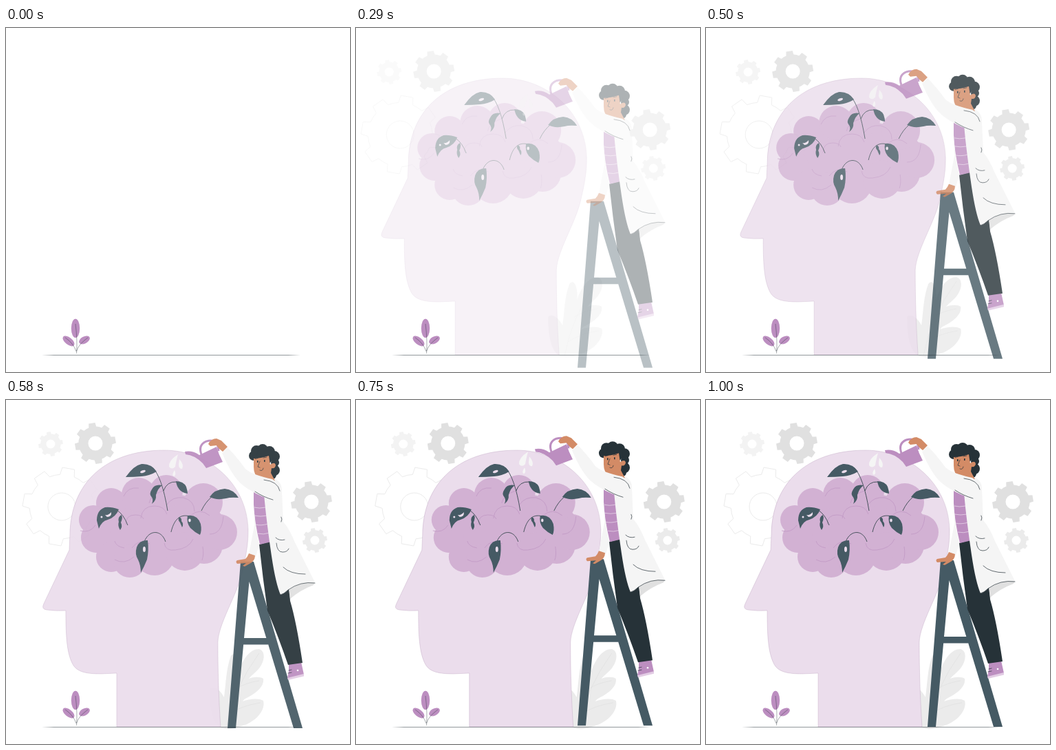
Recreate the animation shown at these times as an HTML page. Size 500 by 500 pixels, loop 1040 ms.

```html
<!DOCTYPE html>
<html lang="en">
<head>
<meta charset="utf-8">
<title>Watering the mind</title>
<style>
  html, body { margin: 0; height: 100%; overflow: hidden; background: #fff; }
  svg { display: block; width: 100vw; height: 100vh; }
  .line { fill: none; stroke: #263238; stroke-width: .7; stroke-linecap: round; }
  .thin { fill: none; stroke: #263238; stroke-width: .4; }
  .stem { fill: none; stroke: #37474f; stroke-width: .9; }
  .purple { fill: #bc8ec0; }
  .skin { fill: #d38b66; }
  .dark { fill: #263238; }
  .slate { fill: #455a64; }
  .coat { fill: #f5f5f5; }
</style>
</head>
<body>
<svg viewBox="0 0 500 500">
  <g class="left" id="gears"></g>

  <g class="left">
    <path fill="#ebebeb" d="M322 478C305 478 298 455 298 420C303 414 313 420 319 432C322 410 322 390 329 372C335 364 342 375 340 395C347 375 357 362 370 362C380 365 378 380 370 390C364 397 358 401 355 405C362 402 372 402 376 405C378 418 362 428 350 434Q347 436 346 438C356 434 370 433 376 437C380 450 365 470 340 475Q330 479 322 478z"/>
    <path fill="none" stroke="#e0e0e0" stroke-width=".7" d="M322 476Q332 420 370 368M336 420Q350 411 370 408M327 456Q345 444 372 440"/>
  </g>

  <g class="left">
    <!-- profile -->
    <path fill="#ebddec" stroke="#a98dad" stroke-width=".3" d="M94 218L57 296Q53 304 61 305Q75 307 89 306C89 340 90 365 98 382C104 396 120 398 140 398L163 397V475H314C311 430 310 390 310 352C311 325 337 285 345 252C354 215 354 200 354 188C352 120 295 73 232 73C143 73 96 124 95 195z"/>
    <!-- brain -->
    <g id="brain" fill="#d2b1d3"><ellipse cx="222" cy="185" rx="100" ry="50"/></g>
    <path fill="none" stroke="#c098c4" stroke-width=".8" d="M173 140q6 -14 22 -12M176 181q0 -14 14 -14q10 0 12 6M198 172q2 -18 20 -18q14 0 18 12M236 152q8 -12 24 -10q16 4 16 20M160 205q2 8 14 10M160 232q14 8 28 -4M185 215q10 -14 26 -6M232 208q2 12 16 10q20 -2 26 -16M288 213q2 12 -1 20M298 195q18 0 20 -26M110 190q14 4 22 -8M270 168q14 -12 28 0M210 150Q212 138 230 132"/>
    <!-- wilting sprouts -->
    <path class="stem" d="M237 161Q229 112 215 98M231 132Q236 118 250 119M286 161Q292 148 302 140M179 182Q173 166 163 160M234 206C228 188 210 188 203 206M242 192C246 175 254 165 269 169"/>
    <path class="slate" d="M221 104Q213 92 199 93Q188 95 176 112Q188 112 199 111Q211 110 221 104z
      M249 118Q260 118 264 126Q266 132 266 136Q258 135 254 130Q250 125 249 118z
      M229 124Q218 122 214 130Q210 136 213 140Q217 144 214 151Q221 146 220 138Q223 128 229 124z
      M298 141Q305 130 320 129Q333 130 340 142Q328 141 322 143Q308 146 298 141z
      M166 159Q155 155 146 156Q134 160 134 175L137 187Q141 176 150 174Q162 170 166 159z
      M170 167Q164 170 166 177Q164 183 168 189Q172 184 169 178Q172 172 170 167z
      M208 204Q196 203 192 214Q189 224 194 232Q198 240 198 251Q203 242 207 232Q210 218 208 204z
      M266 168Q280 166 285 180Q287 190 284 196Q276 192 270 186Q264 178 266 168z
      M254 170Q251 174 255 178L258 185Q261 180 257 176Q258 172 254 170z"/>
    <g fill="#ebddec">
      <ellipse cx="201" cy="104" rx="4" ry="1.8" transform="rotate(-20 201 104)"/>
      <path d="M146 167Q151 168 155 163Q156 170 149 170z"/>
      <circle cx="141" cy="170" r="1.5"/>
      <ellipse cx="203" cy="217" rx="2" ry="4"/>
      <ellipse cx="269" cy="175" rx="1.8" ry="2.4"/>
    </g>
  </g>

  <g class="up">
    <path class="slate" d="M341 233H360L431 475H418L353.500 262L334 475H322zM345 344H381V353.500H345z"/>
  </g>

  <g class="up">
    <!-- shoe, trousers, shirt -->
    <path class="purple" d="M411 382L429 379L433 397L409 403L411 392z"/>
    <path fill="#e2cce4" d="M409 402L433 396V399.500L410 405z"/>
    <circle cx="424" cy="391" r="1.300" fill="#fff"/>
    <path class="line" d="M411 391l4 -1M410 395l5 -1"/>
    <path class="dark" d="M368 208L386 203L412 275L413 290Q422 320 431 380L410 383Q397 345 380 304Q373 255 368 208z"/>
    <path class="purple" d="M360 131H380L386 204L369 208Q361 175 360 150z"/>
    <path fill="none" stroke="#e6d3e8" stroke-width=".8" d="M361 154Q368 156 377 154M361 166Q370 168 379 166M363 179Q370 181 381 178M366 192Q374 194 383 191"/>
    <!-- coat -->
    <path fill="#e0e0e0" d="M411 274Q430 260 449 263L447 267Q428 274 413 287z"/>
    <path class="coat" d="M375 135L392 113Q401 118 401 130L403 175Q412 185 420 205L449 263Q425 262 410 274Q404 280 399 281Q392 265 386 225Q378 170 375 135z"/>
    <path class="coat" d="M361 150Q360 165 361 180L353 222L363 226L368 208Q360 175 361 150z"/>
    <path class="skin" d="M353 221L362 224Q362 232 354 236L347 240L344 239L349 235L336 236Q333 233 336 231L348 229Q351 226 353 221z"/>
    <!-- head -->
    <g id="hair" class="dark"></g>
    <path class="skin" d="M360 83Q370 83 382 79L384 92Q391 87 392 93Q391 98 386 97L385 104Q388 110 391 115Q380 117 368 111Q360 108 360 95z"/>
    <path class="line" d="M362 83.500l4 -1M374 82l5 -1M369 87l-3 8l3 1M369 100q4 2 5 -3"/>
    <path class="dark" d="M365 86h1.600v3h-1.600zM375 85h1.600v3h-1.600z"/>
    <!-- can, raised arm -->
    <path class="purple" d="M260 73Q271 71 281 78L306 66Q309 77 315 88L291 97L286 90Q274 78 261 77z"/>
    <path fill="none" stroke="#bc8ec0" stroke-width="3" d="M284 77Q279 63 291 58Q308 53 309 72"/>
    <path class="coat" d="M322 67L314 75Q328 108 342 120Q352 129 372 138L395 146Q402 140 400 122L387 113Q358 107 348 98Q335 80 322 67z"/>
    <path class="skin" d="M294 62Q298 54 306 54L313 57L322 66L315 73Q310 70 306 64L297 65z"/>
    <path class="line" d="M362 131Q374 139 388 143M375 114Q395 116 398 130M400 168Q402 171 400 175M392 198Q397 203 405 201M393 206Q394 219 402 219Q409 219 411 214M403 241Q413 251 435 251M399 281Q404 280 410 274Q428 261 449 264"/>
  </g>

  <g class="up">
    <path class="coat" d="M250 77Q236 86 237 95Q241 100 246 95Q247 88 250 77zM252 84Q259 92 256 98Q251 98 251 92zM245 100Q248 107 244 109Q240 107 245 100z"/>
  </g>

  <path class="dark" d="M52 475.300L70 475H410L428 475.300L410 475.600H70z"/>
  <g class="purple">
    <ellipse cx="101" cy="436.500" rx="6.200" ry="13.800"/>
    <ellipse cx="91" cy="455" rx="10" ry="5.200" transform="rotate(38 91 455)"/>
    <ellipse cx="114" cy="453.500" rx="8.500" ry="5" transform="rotate(-28 114 453.500)"/>
  </g>
  <path class="thin" d="M102.500 473Q104 455 101 430M102 470Q98 458 86 450M102.500 470Q105 460 119 450"/>
</svg>
<script>
const el = id => document.getElementById(id);

// [x, y, outer radius, hole radius, first tooth angle, paint]
const gears = [
  [83, 155, 57, 20, -80, 'fill="none" stroke="#ebebeb"'],
  [132, 63, 30, 10.5, -100, 'fill="#e0e0e0"'],
  [67, 64, 18, 6.5, -100, 'fill="#f3f3f3"'],
  [446, 148, 30, 10.5, -100, 'fill="#e0e0e0"'],
  [451, 204, 18, 6.5, -100, 'fill="#ebebeb"'],
];

function gear([x, y, r, hole, turn, paint]) {
  const at = (deg, rad) => {
    const a = (deg + turn) * Math.PI / 180;
    return `${(x + rad * Math.cos(a)).toFixed(1)} ${(y + rad * Math.sin(a)).toFixed(1)}`;
  };
  const body = r * .82;
  let d = 'M' + at(-13, body);
  for (let a = 0; a < 360; a += 45)
    d += `L${at(a - 9, r)}L${at(a + 9, r)}L${at(a + 13, body)}A${body} ${body} 0 0 1 ${at(a + 32, body)}`;
  d += `zM${x - hole} ${y}a${hole} ${hole} 0 1 0 ${2 * hole} 0a${hole} ${hole} 0 1 0 ${-2 * hole} 0z`;
  return `<path fill-rule="evenodd" ${paint} d="${d}"/>`;
}

const circles = list => list.map(([x, y, r]) => `<circle cx="${x}" cy="${y}" r="${r}"/>`).join('');

el('gears').innerHTML = gears.map(gear).join('');
el('brain').innerHTML += circles([
  [155, 150, 22], [129, 174, 21], [133, 200, 22], [155, 228, 22], [182, 234, 24],
  [218, 226, 29], [262, 220, 28], [290, 211, 27], [312, 192, 26], [289, 149, 28],
  [235, 133, 24], [195, 138, 25],
]);
el('hair').innerHTML = circles([
  [360, 79, 7], [364, 72, 8], [373, 70, 8], [383, 73, 8], [390, 80, 8],
  [376, 80, 12], [391, 89, 6], [390, 100, 8], [387, 107, 6],
]);

const bezier = (s, a, b) => 3 * (1 - s) ** 2 * s * a + 3 * (1 - s) * s * s * b + s ** 3;

function ease(x) {
  let lo = 0, hi = 1;
  for (let i = 0; i < 24; i++) {
    const mid = (lo + hi) / 2;
    if (bezier(mid, .36, .5) < x) lo = mid; else hi = mid;
  }
  return bezier(lo, -.01, 1.38);
}

const LOOP = 1040, FPS = 24, SLIDE = 30;
const movers = [...document.querySelectorAll('.left, .up')];

function draw() {
  const step = Math.floor((performance.now() % LOOP + 4) * FPS / 1000);
  const p = step < 3 ? 0 : ease(Math.min(1, step / FPS + .033));
  const shift = SLIDE * (1 - p);
  for (const m of movers) {
    m.setAttribute('opacity', Math.min(1, p));
    m.setAttribute('transform', m.matches('.left') ? `translate(${-shift} 0)` : `translate(0 ${shift})`);
  }
  requestAnimationFrame(draw);
}
draw();
</script>
</body>
</html>
```
